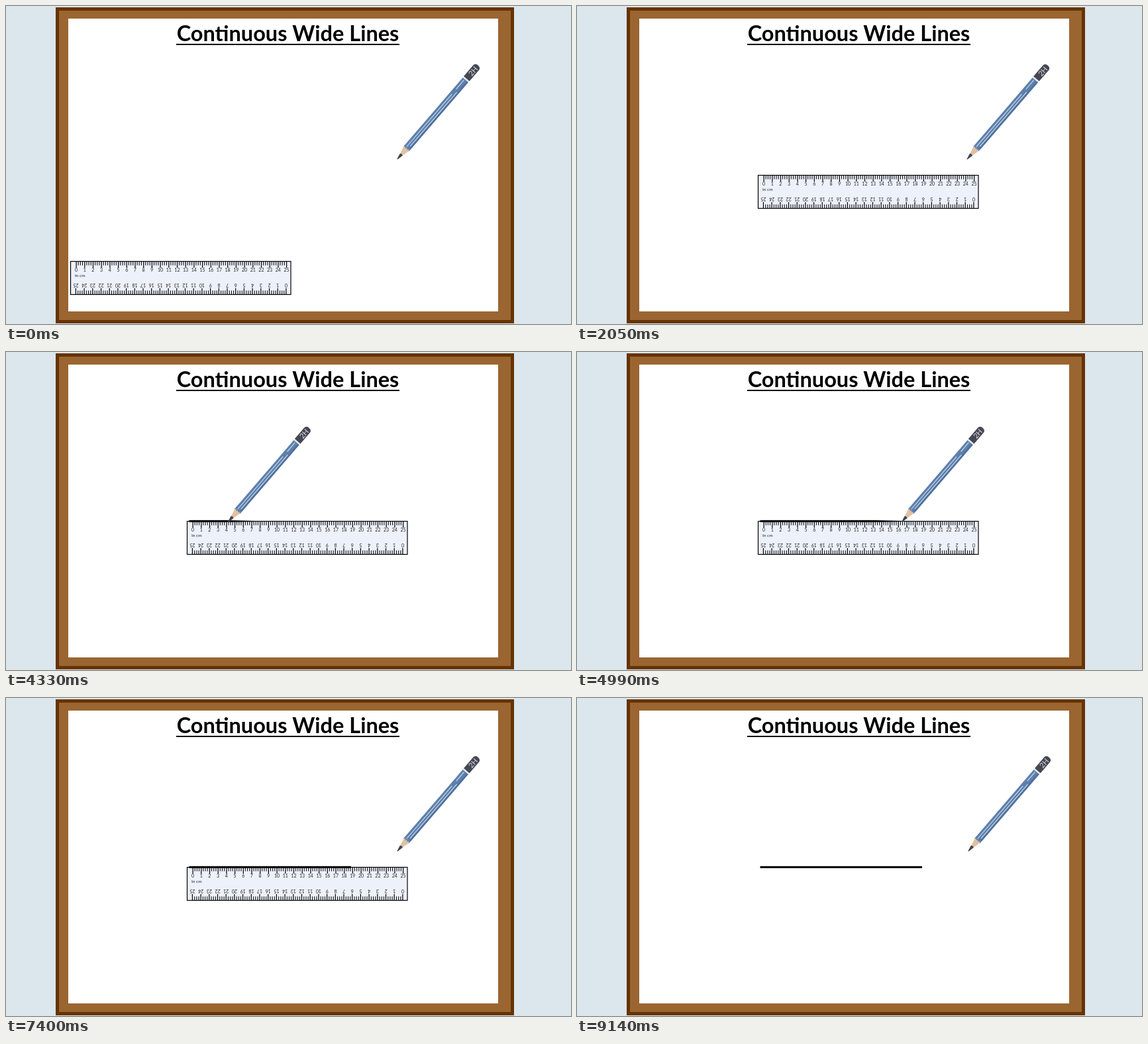
Animation, 853 px wide and 480 px high, one loop 9.2 s. Source, as an HTML page with a canvas:

```html
<!DOCTYPE html>
<html lang="en">
<head>
<meta charset="utf-8">
<title>Continuous Wide Lines</title>
<style>
  html, body { margin: 0; width: 100%; height: 100%; overflow: hidden; background: #dce6ed; }
  canvas { display: block; width: 100vw; height: 100vh; }
</style>
</head>
<body>
<canvas id="stage" width="853" height="480"></canvas>
<script>
const ctx = document.getElementById('stage').getContext('2d');
const LOOP = 9200;
const FONT = 'Lato, Carlito, sans-serif';
const REST = [0, 0], LINE_START = [-315, 25], LINE_END = [-70, 25];

const progress = (t, start, length) => Math.min(1, Math.max(0, (t - start) / length));
const smooth = u => u < 0.5 ? 2 * u * u : 1 - 2 * (1 - u) * (1 - u);
const mix = (a, b, u) => a + (b - a) * u;
const mixPoint = (p, q, u) => [mix(p[0], q[0], u), mix(p[1], q[1], u)];

function box(color, x, y, w, h) {
  ctx.fillStyle = color;
  ctx.fillRect(x, y, w, h);
}

function text(str, x, y, size, color, weight = 400, align = 'center') {
  ctx.font = `${weight} ${size}px ${FONT}`;
  ctx.textAlign = align;
  ctx.fillStyle = color;
  ctx.fillText(str, x, y);
}

function shape(color, points) {
  ctx.fillStyle = color;
  ctx.beginPath();
  points.forEach(([x, y]) => ctx.lineTo(x, y));
  ctx.closePath();
  ctx.fill();
}

function drawBoard() {
  box('#dce6ed', 0, 0, 853, 480);
  box('#663300', 75, 2, 692, 477);
  box('#9a6531', 80, 7, 682, 467);
  box('#ffffff', 94, 19, 649, 442);
  text('Continuous Wide Lines', 425.5, 53, 32.5, '#000', 700);
  box('#000', 257, 57, 337, 2);
}

// One graduated edge, measured from the ruler's top left corner.
function drawScale(baseline) {
  for (let i = 0; i <= 100; i++) {
    const major = i % 4 === 0;
    box('#000', 8.5 + i * 3.175, 1, major ? 1.2 : 1, major ? 9 : 5.5);
    if (major) text(String(i / 4), 9 + i * 3.175, baseline, 7, '#222');
  }
}

function drawRuler(x, y, alpha) {
  if (alpha <= 0) return;
  ctx.save();
  ctx.globalAlpha = alpha;
  ctx.translate(x, y);
  box('#ecf1fa', 0, 0, 333, 50);
  ctx.strokeStyle = '#000';
  ctx.lineWidth = 1.2;
  ctx.strokeRect(0.5, 0.5, 332.5, 50);
  drawScale(16);
  text('In cm', 7, 24, 6.5, '#222', 400, 'left');
  ctx.translate(335, 51);
  ctx.rotate(Math.PI);
  drawScale(17);
  ctx.restore();
}

// Wipe from the left with a soft edge.
function drawLine(p) {
  if (p <= 0) return;
  const left = 276.5, width = 244.5, soft = 42;
  const lead = left + p * (width + soft);
  const fade = ctx.createLinearGradient(lead - soft, 0, lead, 0);
  fade.addColorStop(0, 'rgba(0,0,0,1)');
  fade.addColorStop(1, 'rgba(0,0,0,0)');
  box(fade, left, 253.8, width, 3);
}

// Local x runs from the tip along the pencil.
function drawPencil([dx, dy]) {
  ctx.save();
  ctx.translate(591 + dx, 231 + dy);
  ctx.rotate(Math.atan2(-140, 120.5));
  shape('#e2c0a2', [[0, 0], [22, -5.5], [22, 5.5]]);
  shape('#41444f', [[-0.5, -0.4], [9, -2.6], [10, 0], [9, 2.6], [-0.5, 0.4]]);
  shape('#5d80ac', [[20, -5.5], [158, -5.5], [158, 5.5], [20, 5.5],
    [22, 3.5], [20, 1.8], [22, 0], [20, -1.8], [22, -3.5]]);
  box('#4f729f', 24, 2.8, 134, 2.7);
  box('#d3deeb', 23, -2.2, 105, 1.1);
  box('#d3deeb', 27, 1.5, 108, 1.1);
  box('#d3deeb', 138, -2.2, 18, 1.1);
  box('#e4e7ee', 157.5, -5.5, 2.5, 11);
  ctx.fillStyle = '#454853';
  ctx.beginPath();
  ctx.roundRect(160, -5.7, 26.5, 11.4, [0, 4.5, 4.5, 0]);
  ctx.fill();
  text('2H', 175, 4, 11, '#d8dbe0');
  ctx.restore();
}

function pencilOffset(t) {
  if (t < 3758) return mixPoint(REST, LINE_START, smooth(progress(t, 1960, 1645)));
  if (t < 5515) return mixPoint(LINE_START, LINE_END, smooth(progress(t, 3758, 1640)));
  return mixPoint(LINE_END, REST, smooth(progress(t, 5515, 1655)));
}

function render(t) {
  const slide = smooth(progress(t, 85, 1645));
  const exit = progress(t, 7650, 860);
  drawBoard();
  drawRuler(mix(97, 273, slide), mix(385, 255, slide) + 50 * exit, 1 - exit);
  drawLine(progress(t, 3758, 1640));
  drawPencil(pencilOffset(t));
}

const begin = performance.now();
function tick() {
  render((performance.now() - begin) % LOOP);
  requestAnimationFrame(tick);
}
tick();
</script>
</body>
</html>
```
